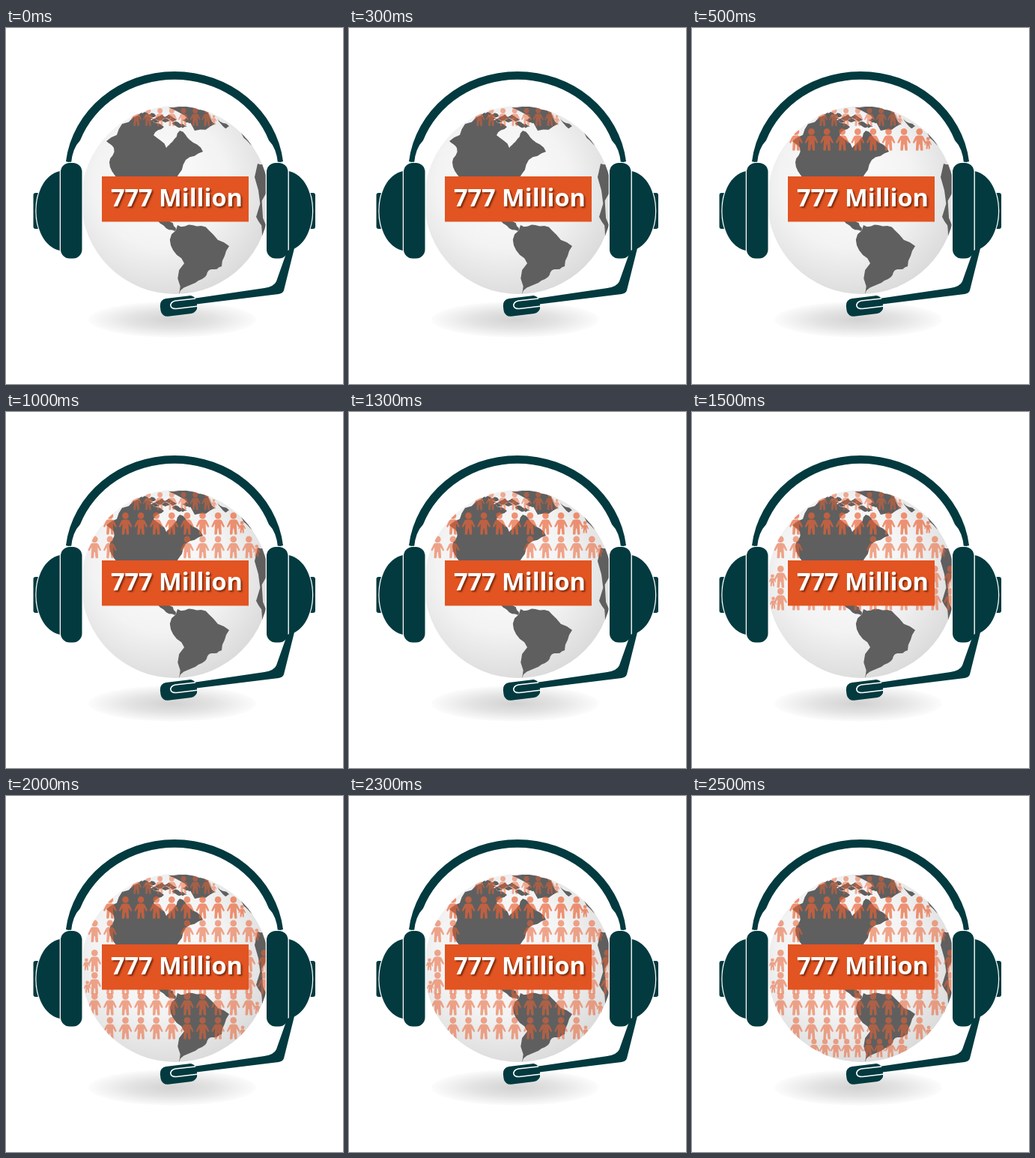
These frames come from a looping animation (450 by 475 pixels, 3000 ms). An HTML page:

```html
<!DOCTYPE html>
<html lang="en">
<head>
<meta charset="utf-8">
<title>777 Million</title>
<style>
html, body { margin: 0; width: 100%; height: 100%; overflow: hidden; background: #fff; }
svg { display: block; width: 450px; height: 475px; }
.set { fill: #023a3f; }
.rim { stroke: #fff; stroke-width: 2.5; paint-order: stroke; }
.label { font: bold 32.5px "Open Sans", sans-serif; fill: #fff; text-shadow: 2px 2px 2px rgba(60, 20, 0, .6); }
</style>
</head>
<body>
<svg viewBox="0 0 450 475">
  <defs>
    <radialGradient id="ball" cx=".42" cy=".4" r=".64">
      <stop offset="0" stop-color="#fcfcfc"/>
      <stop offset=".55" stop-color="#f3f3f3"/>
      <stop offset="1" stop-color="#dadada"/>
    </radialGradient>
    <radialGradient id="shade">
      <stop offset="0" stop-color="#d2d2d2"/>
      <stop offset=".5" stop-color="#e3e3e3"/>
      <stop offset="1" stop-color="#fcfcfc"/>
    </radialGradient>
    <clipPath id="round"><circle cx="226" cy="229.5" r="125.5"/></clipPath>
    <g id="person">
      <circle cy="4.4" r="4.3"/>
      <path d="M-3 9.5H3Q5.200 9.800 6 12.500L8.800 18.500Q8.300 20.500 6.800 19.500L4 15L4.800 29Q3 30.500 1.300 29L.6 21.500H-.6L-1.300 29Q-3 30.500-4.800 29L-4 15L-6.800 19.500Q-8.300 20.500-8.800 18.500L-6 12.500Q-5.200 9.800-3 9.500Z"/>
    </g>
    <g id="cup" class="set">
      <rect x="36.500" y="220" width="10" height="48" rx="3"/>
      <path class="rim" d="M72 191V297C30 288 30 200 72 191Z"/>
      <rect class="rim" x="73" y="180" width="28.500" height="127.500" rx="12"/>
    </g>
  </defs>

  <ellipse cx="222" cy="389" rx="112" ry="24" fill="url(#shade)"/>
  <circle cx="226" cy="229.500" r="125.500" fill="url(#ball)"/>
  <g id="land" fill="#5f5f5f" clip-path="url(#round)"/>
  <g id="crowd" fill="#ea6335" clip-path="url(#round)"/>

  <path class="set" d="M80 178A146 136 0 0 1 370 178L363 180Q361 160 351 150A134.500 125 0 0 0 99 150Q89 160 87 180Z"/>
  <use href="#cup"/>
  <use href="#cup" transform="matrix(-1 0 0 1 449.500 0)"/>

  <path class="set" d="M375.500 297L385 294L371 350Q370 354 364 355L250 369V361L345 347Q358 345 361 338Z"/>
  <rect class="set" x="206" y="359" width="49" height="24" rx="9" transform="rotate(-7 230 371)"/>
  <path fill="none" stroke="#fff" stroke-width="1.600" d="M253 361L226 364Q219 366 220 371Q221 375 228 374.500L257 371"/>

  <rect x="128" y="198" width="196" height="60.500" fill="#e25421"/>
  <text class="label" x="140" y="238">777 Million</text>
</svg>
<script>
const LOOP = 3000, STEPS = 6, MIDDLE = 221.3;
const NS = "http://www.w3.org/2000/svg";
const add = (parent, tag, attrs) => {
  const el = document.createElementNS(NS, tag);
  for (const k in attrs) el.setAttribute(k, attrs[k]);
  return parent.appendChild(el);
};

let seed = 7;
const random = () => (seed = seed * 16807 % 2147483647) / 2147483647;

// Key points of each coast; roughen() adds the small bays.
const coasts = [
  "134,151 155,128 188,118 211,132 197,143 214,160 222,152 232,137 245,149 263,165 240,176 227,201 149,201 138,179 144,160",
  "217,106 245,104 270,113 279,128 252,137",
  "282,121 298,131 293,134",
  "314,135 330,147 341,167 326,155",
  "336,181 352,186 352,275 342,277 334,252",
  "202,256 216,256 227,267 226,271 211,264",
  "229,263 249,263 271,270 298,291 288,318 274,322 266,332 248,342 231,356 238,314 220,290"
];

function roughen(pts) {
  return pts.flatMap(([x, y], i) => {
    const [u, v] = pts[(i + 1) % pts.length];
    const bend = (random() - .5) * .3;
    return [[x, y], [(x + u) / 2 + (v - y) * bend, (y + v) / 2 - (u - x) * bend]];
  });
}

const land = document.getElementById("land");
for (const coast of coasts) {
  const pts = coast.split(" ").map(p => p.split(",").map(Number));
  add(land, "polygon", { points: roughen(roughen(pts)).join(" ") });
}
// Arctic islands
for (let i = 0; i < 16; i++) {
  const x = 176 + i * 4.6, y = 111 + i * .8 + random() * 10;
  const isle = [[x - 5, y], [x, y - 3], [x + 6, y + 1], [x, y + 3]];
  add(land, "polygon", { points: roughen(isle).join(" ") });
}

const crowd = document.getElementById("crowd");

// Fills the width of the globe at one height; wide leftover edges get a child.
function addRow({ step, top, height = 30, pitch = 20.6, alpha = .56, skip = () => false }) {
  const row = add(crowd, "g", { opacity: alpha });
  const stand = (x, y, h) => add(row, "use", {
    href: "#person", transform: `translate(${x} ${y}) scale(${h / 30})`
  });
  const half = Math.sqrt(125 ** 2 - (top + height / 2 - 230) ** 2);
  const left = 226 - half, right = 226 + half;
  const first = MIDDLE - Math.floor((MIDDLE - left) / pitch) * pitch;
  let last = first;
  for (let x = first; x < right; x += pitch) {
    if (!skip(x)) stand(x, top, height);
    last = x;
  }
  const child = x => stand(x, top + height * .38, height * .55);
  if (first - left > pitch * .75) child(left + 6);
  if (right - last > pitch * .75) child(right - 6);

  if (!step) return;
  const offset = step / STEPS;
  row.animate([
    { opacity: 0, offset: 0 },
    { opacity: 0, offset },
    { opacity: alpha, offset },
    { opacity: alpha, offset: 1 }
  ], { duration: LOOP, iterations: Infinity }).startTime = 0;
}

[
  { step: 0, top: 107, height: 24, pitch: 15.7, alpha: .5 },
  { step: 1, top: 134, alpha: .68 },
  { step: 2, top: 165.5, skip: x => x > 150 && x < 235 },
  { step: 3, top: 205 },
  { step: 3, top: 235 },
  { step: 4, top: 263 },
  { step: 4, top: 295 },
  { step: 5, top: 324, height: 25, pitch: 14.6 }
].forEach(addRow);
</script>
</body>
</html>
```
